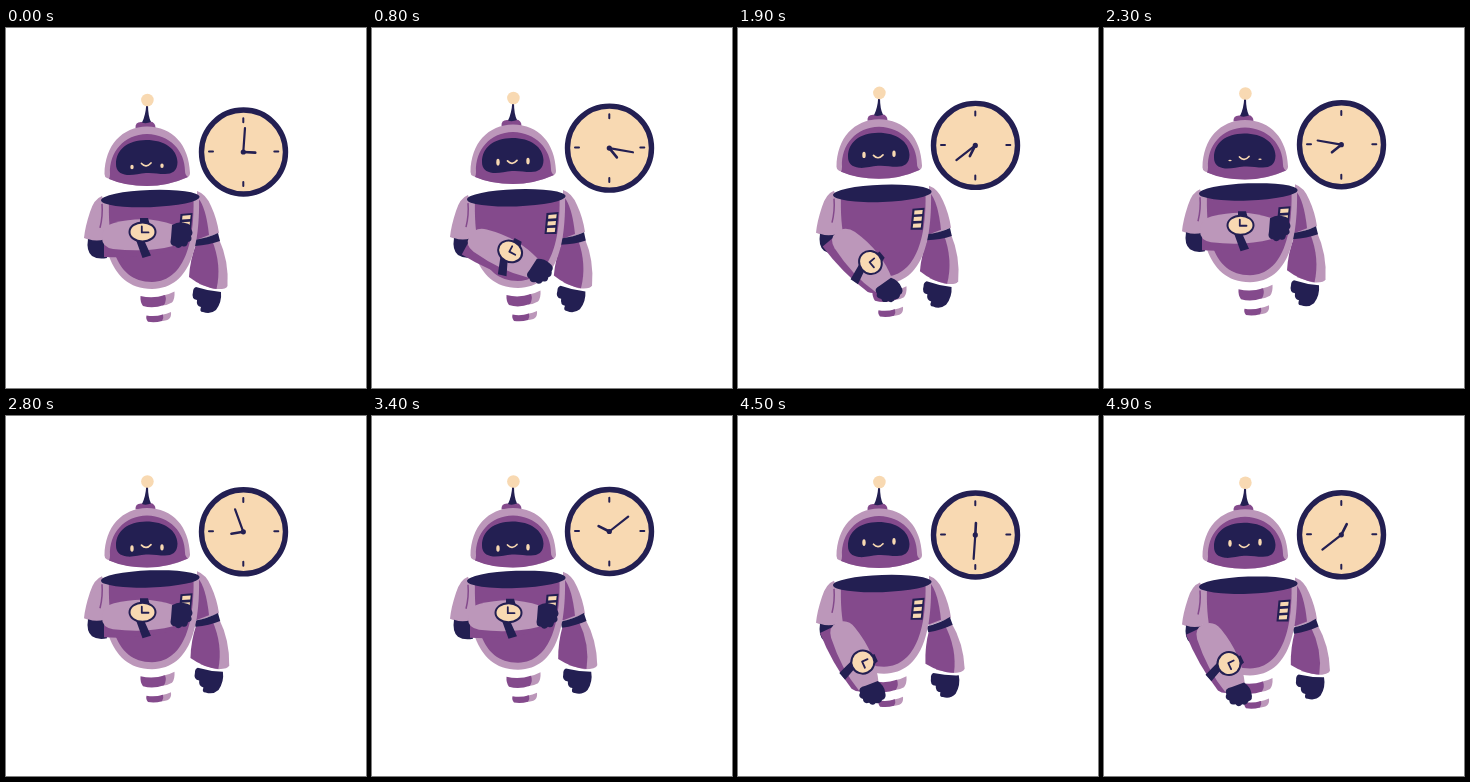
Animation, 360 px wide and 360 px high, one loop 5000 ms. Source, as an HTML page:

```html
<!DOCTYPE html>
<html lang="en">
<head>
<meta charset="utf-8">
<title>Robot checking the time</title>
<style>
  html, body { margin: 0; width: 100%; height: 100%; overflow: hidden; background: #fff; }
  svg { display: block; width: 100vw; height: 100vh; }
  .dark { fill: #231f52; }
  .mid { fill: #844a8c; }
  .light { fill: #bc97ba; }
  .cream { fill: #f8d9b2; }
  .line { fill: none; stroke: #231f52; stroke-linecap: round; stroke-linejoin: round; }
  .rim { stroke: #231f52; }
</style>
</head>
<body>
<svg viewBox="0 0 360 360">
  <g id="clock">
    <circle class="cream rim" cx="237.5" cy="124" r="42" stroke-width="5.4"/>
    <path class="line" stroke-width="2" d="M237.3 90.2v4M237.3 154v4M203 123.5h4M268.3 123.5h4"/>
    <path id="hour" class="line" stroke-width="2.6" d="M237.3 124V112"/>
    <path id="minute" class="line" stroke-width="2.2" d="M237.3 124V100"/>
    <circle class="dark" cx="237.3" cy="124" r="2.6"/>
  </g>

  <g id="body">
    <g id="stripes">
      <path class="light" d="M157 267.5Q164 266 168.5 263.5Q169 271 166 274.5Q162 277 156 277.5Z"/>
      <path class="mid" d="M134.5 268Q147 271 159 267Q161 272 158 277Q147 281 137 278Q134 274 134.5 268Z"/>
      <path class="light" d="M155 287Q161 286 165 284Q165.5 289 163 291Q160 293 154 293Z"/>
      <path class="mid" d="M140.5 287.5Q149 289 157 286.5Q158 290 156 293Q149 295 142 293.8Q139.5 291 140.5 287.5Z"/>
    </g>

    <g>
      <path class="light" d="M191 163Q200 166 205 178Q211 191 213 205L191 213Z"/>
      <path class="mid" d="M192 170Q200 179 203 207L190 212Z"/>
    </g>
    <g id="arm">
      <path class="light" d="M190 216L213 211Q223 233 221.500 258Q220 262 208 261L193 256Z"/>
      <path class="mid" d="M190 216L206 212Q216 237 210.500 261Q196 259 183 249Q184 232 190 216Z"/>
      <path class="dark" d="M188 212Q202 210 212 205L214 213Q203 217 189 218Z"/>
      <path class="dark" d="M190 259Q202 263 215 264Q216 274 210 282Q204 287 197 284Q193 284 195 279Q190 278 191 272Q185 271 187 264Q187 260 190 259Z"/>
    </g>

    <path class="light" d="M96 168Q88 171 84 184Q79 199 78 210Q88 215 98 213L104 190Z"/>
    <path class="dark" d="M82 211Q91 214 99 211L101 230Q92 232 86 228Q80 223 82 211Z"/>
    <path class="light" d="M95 172C96 205 99 261 146 261C186 260 194 215 193 168Z"/>
    <path class="mid" d="M103 172C102 208 106 254 146 254C180 253 188.500 210 187.500 170Z"/>
    <path fill="none" stroke="#844a8c" stroke-width="1.5" d="M96 176Q97 188 94 200"/>
    <ellipse class="dark" cx="144.3" cy="170.7" rx="49.3" ry="8.6" transform="rotate(-2 144 171)"/>
    <g>
      <path class="dark" d="M174.500 186L186.500 185L184.500 207L172.500 207Z"/>
      <path class="cream" d="M176.500 187.800L184.700 187.200L184.200 191.200L176.100 191.700ZM175.900 194.400L184 193.900L183.500 198L175.400 198.400ZM175.200 201L183.300 200.600L182.800 204.800L174.700 205.100Z"/>
    </g>

    <g id="fore">
      <path class="mid" d="M98 205Q125 205 170 206Q170 220 162 224Q130 231 98 229Z"/>
      <path class="light" d="M96 210Q96 198 108 195Q140 187 168 197Q171 208 167 218Q140 225 107 221Q96 219 96 210Z"/>
      <g id="watch">
        <path class="dark" d="M134 190L142 190L144 197L134 197ZM130 212L138 212L145 227.500L136.500 230Z"/>
        <ellipse id="dial" class="cream rim" cx="136.5" cy="204" stroke-width="2"/>
        <path class="line" stroke-width="1.8" d="M135.8 198.5V204.5H142.5"/>
      </g>
      <path class="dark" d="M166 197Q173 193 179 195Q186 196 185 201Q188 205 185 208Q187 213 182 214Q181 220 176 218Q172 222 169 218Q163 218 165 210Z"/>
    </g>
  </g>

  <g id="head">
    <path class="mid" d="M129.5 100Q129 94 135 94L144 93.5Q149.5 94 149.5 100Z"/>
    <path class="dark" d="M140.2 77H142Q142 88 145 94Q140 96 136 94.5Q139.7 87 140.2 77Z"/>
    <circle class="cream" cx="141.4" cy="72" r="6.3"/>
    <path class="light" d="M98.5 146C99 117 116 99 141 98.500C167 99 183 117 184 145Q184 148 181 149.500Q162 158 141 158Q119 158 101 150Q98.500 149 98.500 146Z"/>
    <path class="mid" d="M104 146C103 124 118 106.500 141 106C164 106.500 179 123 179 143Q179 147 182 149Q162 158 141 158Q119 158 103 151Q104 149 104 146Z"/>
    <path class="dark" d="M110 136C110 121 122 112.500 140 112C159 112 171 121 171.500 134C171.500 143 166 146 159 146C152 146 147 144.500 140 145C133 145.500 128 147.500 121 147C114 146 110 143 110 136Z"/>
    <path id="smile" fill="none" stroke="#f8d9b2" stroke-width="1.7" stroke-linecap="round" d="M135.5 135.5Q140 140.5 145 135"/>
    <ellipse id="eyeL" class="cream" cx="126" rx="1.7"/>
    <ellipse id="eyeR" class="cream" cx="156" rx="1.7"/>
  </g>
</svg>

<script>
const LOOP = 5000, STEP = 100;
const el = id => document.getElementById(id);
const set = (id, attrs) => { for (const k in attrs) el(id).setAttribute(k, attrs[k]); };
const move = (id, value) => el(id).setAttribute("transform", value);
const shift = (id, y, x = 0) => move(id, `translate(${x} ${y})`);
const turn = (id, a, x, y) => move(id, `rotate(${a} ${x} ${y})`);

// [seconds, value]
const clockY = [[0, 0], [.8, -3.9], [1.5, -5.7], [2.3, -7.3], [3.4, -8.5], [4.1, -5.3], [4.9, -5.2]];
const headY = [[0, 0], [.8, -2], [1.5, -6.2], [2, -7.2], [2.3, -6.5], [3.4, -6.5], [4.1, -6.5], [4.9, -5.2]];
const armTurn = [[0, 0], [.8, 1.6], [1.5, 2.4], [2.3, 0], [3.4, -4.2], [4.1, -6.2], [4.9, -5]];
const eyeSize = [[0, 2.2], [.25, 3.4], [2.1, 3.2], [2.3, .8], [2.5, 3.2], [3.4, 3.2], [3.95, 3.2], [4.1, 2.3], [4.25, 3.4], [4.9, 3.4]];

// Smooth curve through the keys
function curve(keys, t) {
  const last = keys.length - 1;
  let i = 0;
  while (i < last - 1 && t > keys[i + 1][0]) i++;
  const slope = k => {
    const a = keys[Math.max(k - 1, 0)], b = keys[Math.min(k + 1, last)];
    return (b[1] - a[1]) / (b[0] - a[0]);
  };
  const [t0, v0] = keys[i], [t1, v1] = keys[i + 1];
  const d = t1 - t0, u = Math.min((t - t0) / d, 1), w = 1 - u;
  return v0 * w * w * (1 + 2 * u) + v1 * u * u * (3 - 2 * u)
    + d * u * w * (w * slope(i) - u * slope(i + 1));
}

function linear(keys, t) {
  let i = 0;
  while (i < keys.length - 2 && t > keys[i + 1][0]) i++;
  const [t0, v0] = keys[i], [t1, v1] = keys[i + 1];
  return v0 + (v1 - v0) * Math.min((t - t0) / (t1 - t0), 1);
}

function ease(t, from, to) {
  const u = Math.min(Math.max((t - from) / (to - from), 0), 1);
  return u * u * (3 - 2 * u);
}

function draw(t) {
  shift("clock", curve(clockY, t));
  turn("hour", 93 + 60 * t, 237.3, 124);
  turn("minute", 4 + 120 * t, 237.3, 124);

  shift("body", -3.9 * (1 - Math.cos(2 * Math.PI * (t - .2) / 5.5)));
  turn("arm", curve(armTurn, t), 203, 206);

  // 0 = watch raised, 1 = arm hanging
  const p = t % 3.14;
  const drop = ease(p, .48, 1.18) - ease(p, 1.74, 2.25);
  turn("fore", 65 * drop, 97, 212);
  shift("watch", -1.5 * drop, 6 * drop);
  set("dial", { rx: 13 - 1.5 * drop, ry: 9.5 + 2 * drop });

  shift("head", curve(headY, t));
  shift("smile", -1.3 * drop);
  const ry = linear(eyeSize, t), y = 139 - 6.5 * drop;
  set("eyeL", { cy: y, ry });
  set("eyeR", { cy: y - 1.2, ry });
}

const start = performance.now();
function tick(now) {
  const ms = Math.max(now - start, 0) % LOOP;
  draw(Math.floor(ms / STEP) * STEP / 1000);
  requestAnimationFrame(tick);
}
draw(0);
requestAnimationFrame(tick);
</script>
</body>
</html>
```
